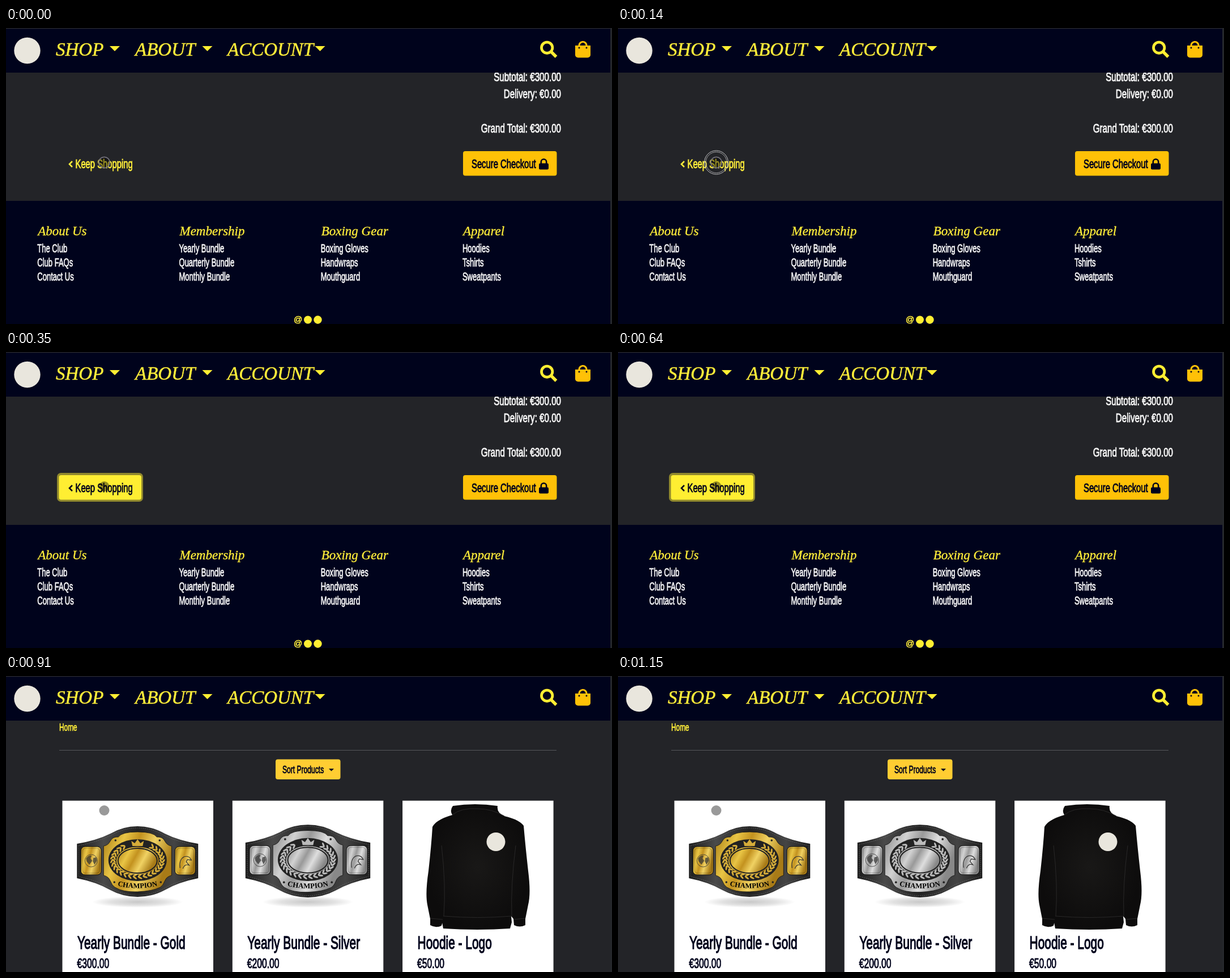
Recreate the animation shown at these times as an HTML page. Size 1070 by 524 pixels, loop 1.26 s.

```html
<!DOCTYPE html>
<html lang="en">
<head>
<meta charset="utf-8">
<title>Shopping bag</title>
<style>
html, body { margin: 0; height: 100%; overflow: hidden; background: #232428; }
svg { display: block; width: 100vw; height: 100vh; }
.sans { font-family: "Liberation Sans", Arial, sans-serif; stroke: currentColor; stroke-width: .042em; }
.script { font-family: "Liberation Serif", "Times New Roman", serif; font-style: italic; stroke: currentColor; stroke-width: .016em; }
.yellow { color: #ffee3a; }
.white { color: #f6f6f6; }
.ink { color: #00031c; }
text { fill: currentColor; }
</style>
</head>
<body>
<svg viewBox="0 0 1070 524" preserveAspectRatio="none">
  <defs>
    <linearGradient id="gold" x2="1" y2=".35">
      <stop stop-color="#a97d16"/><stop offset=".3" stop-color="#e9c545"/>
      <stop offset=".5" stop-color="#c3921f"/><stop offset=".72" stop-color="#f0d263"/>
      <stop offset="1" stop-color="#a87b17"/>
    </linearGradient>
    <linearGradient id="silver" x2="1" y2=".35">
      <stop stop-color="#888"/><stop offset=".3" stop-color="#d2d2d2"/>
      <stop offset=".5" stop-color="#999"/><stop offset=".72" stop-color="#dedede"/>
      <stop offset="1" stop-color="#888"/>
    </linearGradient>
    <linearGradient id="strap">
      <stop stop-color="#1c1c1c"/><stop offset=".22" stop-color="#4a4a4a"/>
      <stop offset=".5" stop-color="#222"/><stop offset=".8" stop-color="#444"/><stop offset="1" stop-color="#1c1c1c"/>
    </linearGradient>
    <radialGradient id="shade">
      <stop stop-color="#c8c8c8"/><stop offset=".6" stop-color="#e2e2e2"/><stop offset="1" stop-color="#fff"/>
    </radialGradient>
    <radialGradient id="cloth">
      <stop stop-color="#191817"/><stop offset="1" stop-color="#0d0c0c"/>
    </radialGradient>
    <path id="arc" d="M-40 43Q0 54 40 43"/>
  </defs>
  <rect width="1070" height="524" fill="#232428"/>

  <g id="bag">
    <g id="totals"></g>
    <g id="keepBox">
      <rect x="90" y="214" width="152" height="51" rx="7" fill="#91892d"/>
      <rect x="93.5" y="218" width="145.5" height="43.5" rx="4" fill="#ffee32"/>
    </g>
    <g id="keep">
      <path d="M117 236l-5 5 5 5" fill="none" stroke="currentColor" stroke-width="2.6"/>
    </g>
    <rect x="807" y="218" width="165.5" height="43.5" rx="4" fill="#ffc107"/>
    <g id="pay" class="ink">
      <rect x="941" y="239.5" width="17" height="11" rx="2.2" fill="currentColor"/>
      <path d="M944.8 241v-4a4.7 4.7 0 0 1 9.4 0v4" fill="none" stroke="currentColor" stroke-width="2.6"/>
    </g>
    <rect y="306" width="1067" height="218" fill="#00031c"/>
    <g id="footer"></g>
    <g fill="#ffee32"><circle cx="533" cy="516.5" r="7"/><circle cx="550.5" cy="516.5" r="7.2"/></g>
  </g>

  <g id="shop">
    <path d="M94 131.5H972" stroke="#55575b"/>
    <rect x="476" y="147.5" width="114.5" height="35.5" rx="4" fill="#ffcd32"/>
    <path d="M570 164h9l-4.5 4.5z" fill="#00031c"/>
    <g id="cards"></g>
    <g>
      <path fill="url(#cloth)" d="M789 230Q828 224 868 230 866 242 880 248 906 254 914 265 917 300 922 345 927 385 922 405L917 430 917 441Q907 446 897 441L896 430 892 425 893 436 890 447Q833 451 772 447L770 436 773 425 772 430 769 442Q759 447 749 441L749 430 744 405Q740 385 746 345 751 300 753 267 760 254 788 246 783 238 789 230Z"/>
      <path fill="none" stroke="#292828" d="M788 246Q803 233 833 235 858 235 880 248M769 300Q777 370 773 425M900 300Q891 370 893 425M772 425Q833 430 893 425M749 429l22 2M917 429l-21 2"/>
      <circle cx="865" cy="293.5" r="16.5" fill="#e9e6dd"/>
    </g>
  </g>

  <rect width="1067" height="79" fill="#00031c"/>
  <rect width="1070" height="1.3" fill="#29292d"/>
  <rect x="1067" width="3" height="524" fill="#25272b"/>
  <circle cx="37.5" cy="40" r="23.2" fill="#e9e6dd"/>
  <g id="nav" fill="#ffee32">
    <path d="M183 32h18l-9 9zM346.5 32h18l-9 9zM545.5 32h18l-9 9z"/>
    <g fill="none" stroke="#ffee32" stroke-width="4.8">
      <circle cx="955.2" cy="34.8" r="9.7"/><path d="M962 41.500l9.500 9.500" stroke-width="5.400"/>
    </g>
    <path fill="#ffc107" d="M1005 31h27v16.500a5 5 0 0 1-5 5h-17a5 5 0 0 1-5-5z"/>
    <path d="M1012 35v-4a6.500 6.500 0 0 1 13 0v4" fill="none" stroke="#ffc107" stroke-width="3.200"/>
    <g fill="#00031c"><circle cx="1012" cy="35" r="1.500"/><circle cx="1025" cy="35" r="1.500"/></g>
  </g>

  <g transform="translate(173.5 238)" fill="none">
    <circle r="9" fill="#000" fill-opacity=".4"/>
    <circle id="ring" r="9.7" stroke="#74727d" stroke-width="1.7"/>
    <g id="ripple" stroke="#c4c4c6"><circle r="21"/><circle r="18.5" stroke-opacity=".8"/></g>
  </g>
</svg>
<script>
const el = id => document.getElementById(id);
const add = (id, markup) => el(id).insertAdjacentHTML('beforeend', markup);

// One narrow face serves all the sans text.
const sans = (str, x, y, size, tone = '', anchor = 'start') =>
  `<text class="sans ${tone}" transform="translate(${x} ${y}) scale(.665 1)" font-size="${size}" text-anchor="${anchor}">${str}</text>`;
const script = (str, x, y, size) =>
  `<text class="script yellow" x="${x}" y="${y}" font-size="${size}">${str}</text>`;

// Pairs of leaves along an oval, left open at the top for the crown.
function laurel(fill) {
  let leaves = '';
  for (let i = 0; i < 26; i++) {
    const a = -0.95 + i * 0.202, turn = a * 180 / Math.PI + 90;
    for (const side of [-1, 1]) {
      const x = (43.5 + side * 2.2) * Math.cos(a), y = (29 + side * 2.2) * Math.sin(a) - 1;
      leaves += `<ellipse rx="4.2" ry="1.5" fill="${fill}" transform="translate(${x} ${y}) rotate(${turn + side * 32})"/>`;
    }
  }
  return leaves;
}

function belt(x, y, scale, metal, leaf) {
  const fill = `url(#${metal})`;
  const plate = px => `<rect x="${px}" y="-25" width="36" height="50" rx="7" fill="${fill}" stroke="#111"/>
    <rect x="${px + 3}" y="-22" width="30" height="44" rx="5" fill="none" stroke="#0005" stroke-width=".8"/>`;
  return `<ellipse cx="${x}" cy="400" rx="80" ry="10" fill="url(#shade)"/>
  <g transform="translate(${x} ${y}) scale(${scale})">
    <path fill="url(#strap)" d="M-107-30Q-72-36-48-48-26-61 0-61T48-48Q72-36 107-30V31Q72 38 48 52 26 64 0 64T-48 52Q-72 38-107 31Z"/>
    <path fill="none" stroke="#777" stroke-width=".6" stroke-dasharray="2 1.5" d="M-104-27Q-72-33-47-45-25-58 0-58T47-45Q72-33 104-27V28Q72 35 47 49 25 61 0 61T-47 49Q-72 35-104 28Z"/>
    ${plate(-100)}${plate(66)}
    <circle cx="-82" r="11" fill="none" stroke="#333" stroke-width=".8"/>
    <path fill="#333b" d="M-91-4q4-6 10-5l-2 5 3 4-5 7-5-6zM-78-5l5-1 1 6-4 7-3-6z"/>
    <path fill="none" stroke="#333" stroke-width="1.2" d="M75 13q-2-15 7-20 9-3 13 6l-7-1-2 4 5 6q-8-3-11 6"/>
    <path fill="${fill}" stroke="#111" stroke-width=".8" d="M-60-26Q-52-27-48-35T-34-42Q-28-51 0-51T34-42Q44-43 48-35T60-26V26Q51 28 48 36T40 47Q26 54 0 55T-40 47Q-45 44-48 36T-60 26Z"/>
    <ellipse cy="-1" rx="51.5" ry="37" fill="#222"/>
    ${laurel(leaf)}
    <path fill="${leaf}" d="M-9-26l-2-9 6 4 5-7 5 7 6-4-2 9z"/>
    <ellipse rx="37.5" ry="24.5" fill="${fill}"/>
    <ellipse rx="34.5" ry="22" fill="${fill}" stroke="#222" stroke-width="2"/>
    <text font-family="Liberation Serif, serif" font-weight="bold" font-size="12.6" fill="#1b1b1b" text-anchor="middle"><textPath href="#arc" startOffset="50%">CHAMPION</textPath></text>
    <g fill="#222"><circle cx="-41" cy="38" r="1.8"/><circle cx="41" cy="38" r="1.8"/><circle cx="-39" cy="-36" r="1.8"/><circle cx="39" cy="-36" r="1.8"/></g>
  </g>`;
}

[['SHOP', 88], ['ABOUT', 228], ['ACCOUNT', 391]].forEach(([s, x]) => add('nav', script(s, x, 49, 33)));

[['Subtotal: €300.00', 94], ['Delivery: €0.00', 124], ['Grand Total: €300.00', 185]]
  .forEach(([s, y]) => add('totals', sans(s, 980, y, 22.8, 'white', 'end')));
add('keep', sans('Keep Shopping', 122.5, 248, 22.3));
add('pay', sans('Secure Checkout', 822, 248, 22.3));

[['About Us', 'The Club', 'Club FAQs', 'Contact Us'],
 ['Membership', 'Yearly Bundle', 'Quarterly Bundle', 'Monthly Bundle'],
 ['Boxing Gear', 'Boxing Gloves', 'Handwraps', 'Mouthguard'],
 ['Apparel', 'Hoodies', 'Tshirts', 'Sweatpants']].forEach(([head, ...links], col) => {
  const x = 55.3 + col * 250.2;
  add('footer', script(head, x + 1, 367, 23));
  links.forEach((s, i) => add('footer', sans(s, x, 397 + i * 25, 19.6, 'white')));
});
add('footer', '<text class="sans yellow" x="515.5" y="521" font-size="15" text-anchor="middle">@</text>');

add('shop', sans('Home', 94, 97, 17.8, 'yellow') + sans('Sort Products', 488, 172, 18.2, 'ink'));
[['Yearly Bundle - Gold', '€300.00'], ['Yearly Bundle - Silver', '€200.00'], ['Hoodie - Logo', '€50.00']]
  .forEach(([name, price], i) => {
    const x = 99.5 + i * 300.3;
    add('cards', `<rect x="${x}" y="220.7" width="266.5" height="304" fill="#fff"/>` +
      sans(name, x + 26.5, 482.5, 31.4, 'ink') + sans(price, x + 26, 517, 23.6, 'ink'));
  });
add('cards', belt(232.3, 327, 1, 'gold', '#d6ad3a') + belt(533, 326, 1.03, 'silver', '#bbb'));

const show = (id, on) => el(id).style.display = on ? '' : 'none';

function draw(now) {
  const t = now % 1260, pressed = t >= 350, loaded = t >= 840;
  show('bag', !loaded);
  show('shop', loaded);
  show('keepBox', pressed);
  el('keep').setAttribute('class', pressed ? 'ink' : 'yellow');
  show('ring', !pressed);
  show('ripple', t >= 140 && t < 280);
  requestAnimationFrame(draw);
}
draw(0);
</script>
</body>
</html>
```
